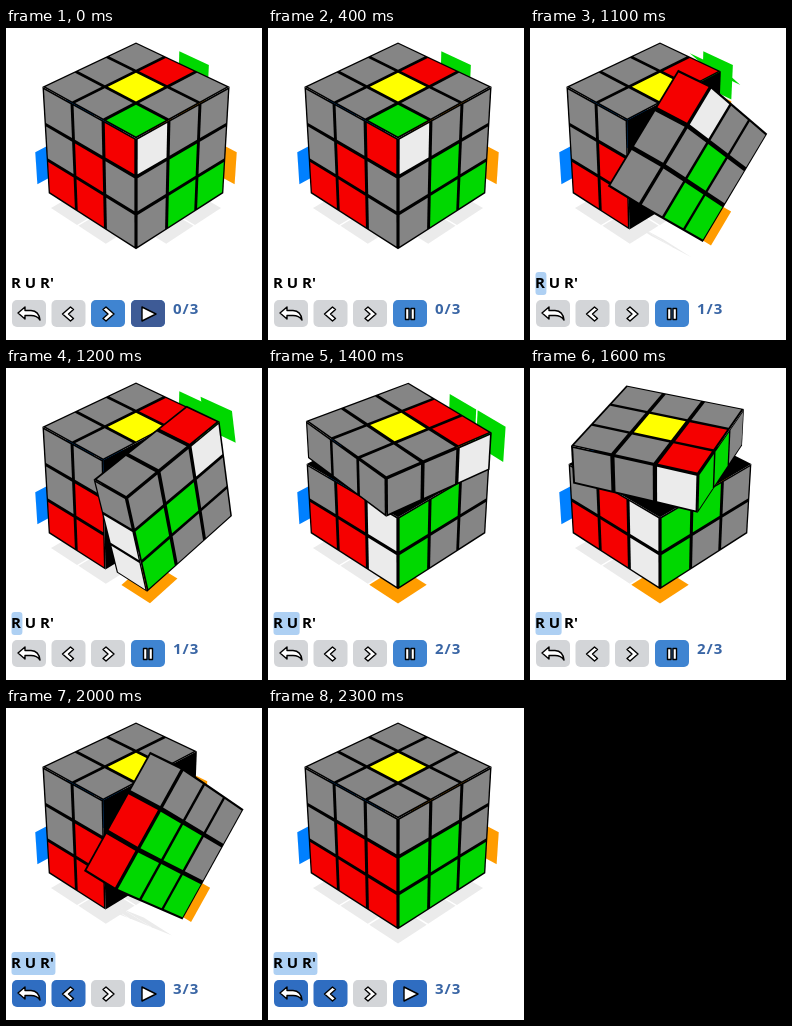
An HTML page with a canvas that plays this animation: 256x312 px, repeating every 3100 ms.

```html
<!DOCTYPE html>
<html lang="en">
<head>
<meta charset="utf-8">
<title>R U R'</title>
<style>
html, body { margin: 0; width: 100%; height: 100%; overflow: hidden; background: #fff; }
canvas { display: block; }
</style>
</head>
<body>
<canvas id="stage" width="256" height="312"></canvas>
<script>
const ctx = document.getElementById('stage').getContext('2d');
const LOOP = 3100, STEP = 100, TURN = 410;

// axis: 0 = right, 1 = up, 2 = front
const moves = [
  { text: 'R', axis: 0, dir: 1, start: 890 },
  { text: 'R U', axis: 1, dir: 1, start: 1327 },
  { text: "R U R'", axis: 0, dir: -1, start: 1790 }
];

const GREY = '#858585';
const faceColors = [['#0080ff', '#00d800'], ['#ebebeb', '#ffff00'], ['#ff9c00', '#f50000']];

const CX = 130, CY = 113.8, FOCUS = 1022, DIST = 24, PITCH = 33.7 * Math.PI / 180;
const COS = Math.cos(PITCH), SIN = Math.sin(PITCH);
const camera = [COS * Math.SQRT1_2, SIN, COS * Math.SQRT1_2].map(v => v * DIST);

const clamp = v => Math.max(0, Math.min(1, v));
const ease = v => (1 - Math.cos(Math.PI * clamp(v))) / 2;

function rotate(v, axis, angle) {
  const j = (axis + 1) % 3, k = (axis + 2) % 3;
  const c = Math.cos(angle), s = Math.sin(angle), out = [...v];
  out[j] = v[j] * c + v[k] * s;
  out[k] = v[k] * c - v[j] * s;
  return out;
}

function project([x, y, z]) {
  const h = (x + z) * Math.SQRT1_2;
  const scale = FOCUS / (DIST - h * COS - y * SIN);
  return [CX + (x - z) * Math.SQRT1_2 * scale, CY - (y * COS - h * SIN) * scale];
}

// Stickers of the finished position: bottom layer, centres and one edge are coloured.
function solvedStickers() {
  const list = [], range = [-1, 0, 1];
  for (const x of range) for (const y of range) for (const z of range) {
    const pos = [x, y, z];
    const known = y === -1 || Math.abs(x) + Math.abs(y) + Math.abs(z) === 1 ||
      (y === 0 && x === 1 && z === 1);
    pos.forEach((side, axis) => {
      if (!side) return;
      const normal = [0, 0, 0];
      normal[axis] = side;
      list.push({ pos, normal, color: known ? faceColors[axis][side > 0 ? 1 : 0] : GREY });
    });
  }
  return list;
}
const solved = solvedStickers();

// Undo every move that is not complete yet; at most one is part way.
function pose(t) {
  let stickers = solved, layer = null;
  for (const { axis, dir, start } of [...moves].reverse()) {
    const done = ease((t - start) / TURN);
    if (done === 1) break;
    const angle = -dir * (1 - done) * Math.PI / 2;
    if (done > 0) {
      layer = { axis, angle };
      break;
    }
    const back = v => rotate(v, axis, angle).map(Math.round);
    stickers = stickers.map(s => s.pos[axis] === 1
      ? { pos: back(s.pos), normal: back(s.normal), color: s.color } : s);
  }
  return { stickers, layer };
}

// Rectangle across the given axis, drawn when it faces the wanted way.
function quad(center, half, axis, side, color, spin, front = true) {
  const j = (axis + 1) % 3, k = (axis + 2) % 3;
  const normal = [0, 0, 0];
  normal[axis] = side;
  const n = spin(normal), c = spin(center);
  const facing = n.reduce((sum, v, i) => sum + v * (camera[i] - c[i]), 0) > 0;
  if (facing !== front) return;
  ctx.beginPath();
  for (const [a, b] of [[-1, -1], [1, -1], [1, 1], [-1, 1]]) {
    const p = [...center];
    p[j] += a * half[j];
    p[k] += b * half[k];
    ctx.lineTo(...project(spin(p)));
  }
  ctx.fillStyle = color;
  ctx.fill();
}

function drawSticker({ pos, normal, color }, size, offset, spin, front) {
  const axis = normal.findIndex(v => v);
  const center = [...pos];
  center[axis] = normal[axis] * offset;
  quad(center, [size, size, size], axis, normal[axis], color, spin, front);
}

function drawBox(low, high, spin) {
  const mid = low.map((v, i) => (v + high[i]) / 2);
  const half = low.map((v, i) => (high[i] - v) / 2);
  for (let axis = 0; axis < 3; axis++) for (const side of [-1, 1]) {
    const center = [...mid];
    center[axis] += side * half[axis];
    quad(center, half, axis, side, '#000', spin);
  }
}

function drawCube(t) {
  const { stickers, layer } = pose(t);
  const still = v => v;
  const turn = v => rotate(v, layer.axis, layer.angle);
  const inLayer = s => layer !== null && s.pos[layer.axis] === 1;

  // floating copies of the hidden coloured stickers
  for (const s of stickers) {
    if (s.color !== GREY) drawSticker(s, .475, 1.95, inLayer(s) ? turn : still, false);
  }
  for (const moving of layer ? [false, true] : [false]) {
    const low = [-1.5, -1.5, -1.5], high = [1.5, 1.5, 1.5];
    if (layer) (moving ? low : high)[layer.axis] = .5;
    const spin = moving ? turn : still;
    drawBox(low, high, spin);
    for (const s of stickers) {
      if (inLayer(s) === moving) drawSticker(s, .45, 1.5, spin, true);
    }
  }
}

const icons = {
  reset: new Path2D('M-11 -1L-4 -7V-3.5H2Q10 -3 11 6Q8 1.5 2 1.5H-4V5Z'),
  prev: new Path2D('M2 -7L5 -4.5L0 0L5 4.5L2 7L-6 0Z'),
  next: new Path2D('M-2 -7L-5 -4.5L0 0L-5 4.5L-2 7L6 0Z'),
  play: new Path2D('M-6 -7L8 0L-6 7Z'),
  pause: new Path2D('M-4.5 -5.5H-1V5.5H-4.5ZM1 -5.5H4.5V5.5H1Z')
};
const OFF = '#d3d5d8', ON = '#3f84d1', READY = '#2f6dc1', PRESSED = '#3e5b96';

// The top colour lies over the base with the given strength.
function button(x, icon, base, top = base, strength = 0) {
  ctx.beginPath();
  ctx.roundRect(x, 272, 34, 27, 5);
  ctx.fillStyle = base;
  ctx.fill();
  ctx.globalAlpha = strength;
  ctx.fillStyle = top;
  ctx.fill();
  ctx.globalAlpha = 1;
  ctx.save();
  ctx.translate(x + 17, 286);
  ctx.lineWidth = 1.4;
  ctx.lineJoin = 'round';
  ctx.strokeStyle = '#000';
  ctx.fillStyle = '#fff';
  ctx.fill(icons[icon]);
  ctx.stroke(icons[icon]);
  ctx.restore();
}

function drawControls(t) {
  const count = moves.filter(m => t >= m.start).length;
  const ended = count === moves.length;
  ctx.font = 'bold 15px "Open Sans", "Noto Sans", sans-serif';
  ctx.letterSpacing = '0px';
  if (count) {
    ctx.fillStyle = '#aed0f3';
    ctx.beginPath();
    ctx.roundRect(5.5, 244, ctx.measureText(moves[count - 1].text).width + 1, 23, 3);
    ctx.fill();
  }
  ctx.fillStyle = '#000';
  ctx.fillText("R U R'", 5, 260);

  const fade = 1 - clamp(t / 400);
  button(6, 'reset', ended ? READY : OFF);
  button(45.5, 'prev', ended ? READY : OFF);
  button(85, 'next', OFF, ON, fade);
  button(125, t < STEP || ended ? 'play' : 'pause', ended ? READY : ON, PRESSED, fade);

  ctx.letterSpacing = '1px';
  ctx.fillStyle = '#3a66a5';
  ctx.fillText(count + '/' + moves.length, 167, 286);
}

function frame() {
  const t = Math.floor(performance.now() % LOOP / STEP) * STEP;
  ctx.fillStyle = '#fff';
  ctx.fillRect(0, 0, 256, 312);
  drawCube(t);
  drawControls(t);
  requestAnimationFrame(frame);
}
frame();
</script>
</body>
</html>
```
